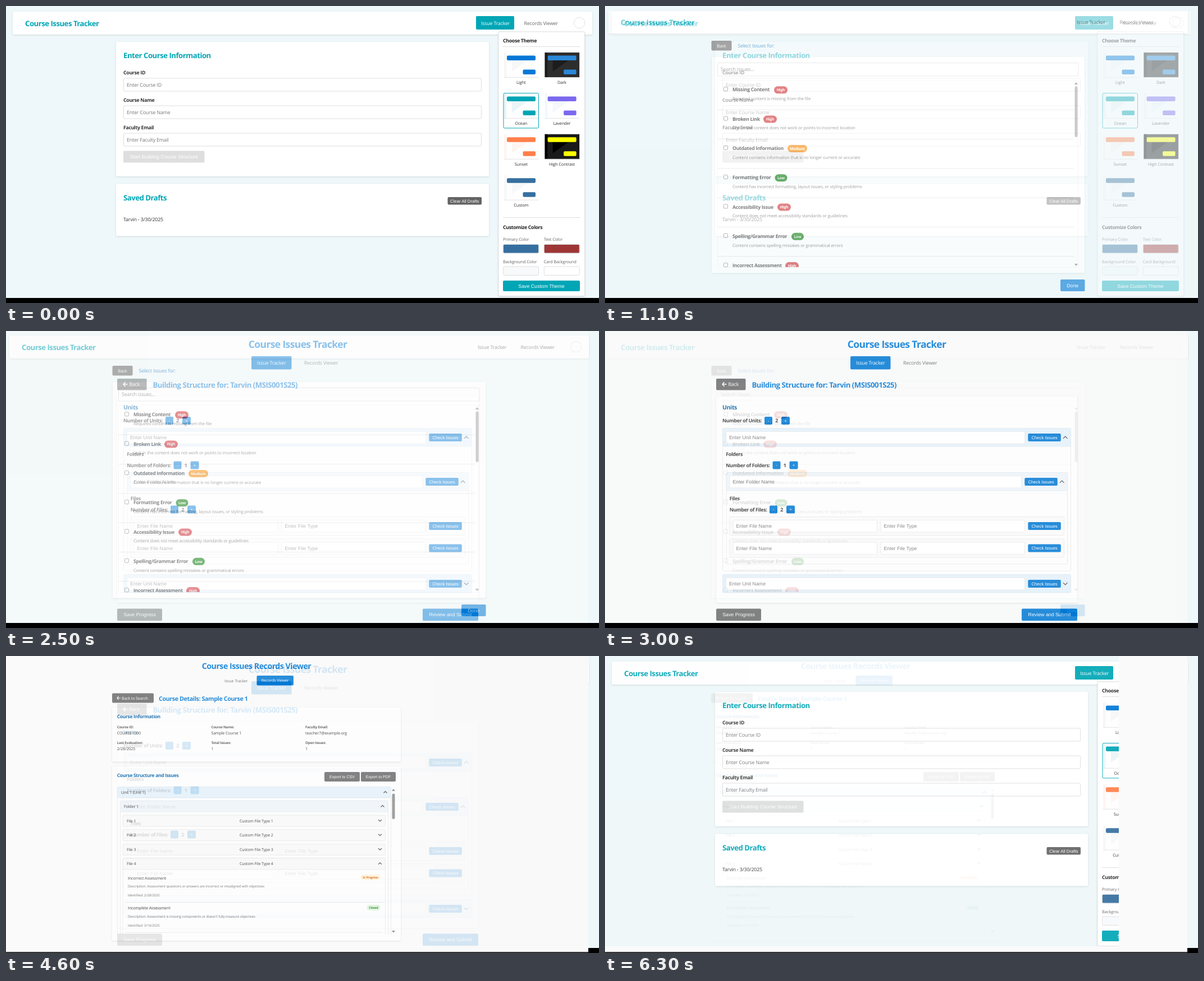
An HTML page that plays this animation: 1056 px wide and 530 px high, repeating every 6.4 s.

```html
<!DOCTYPE html>
<html lang="en">
<head>
<meta charset="utf-8">
<title>Course Issues Tracker</title>
<style>
  html, body { margin: 0; width: 100%; height: 100%; overflow: hidden; background: #eef7f9; }
  #stage { display: block; width: 1056px; height: 530px; }
  text { font-family: 'Open Sans', 'Noto Sans', sans-serif; letter-spacing: -.018em; text-rendering: geometricPrecision; }
  .b { font-weight: 700; letter-spacing: -.038em; }
  .a { font-family: 'Liberation Sans', Arial, sans-serif; letter-spacing: 0; }
  .m { text-anchor: middle; }
  .sh { filter: drop-shadow(0 1px 1.5px rgba(0, 0, 0, .12)); }
</style>
</head>
<body>
<svg id="stage" viewBox="0 0 1056 530"></svg>
<script>
const TEAL = '#00a6b6', BLUE = '#0078d4', NAVY = '#0061a8', GREY = '#6b6b6b',
      INK = '#333', SOFT = '#666', HINT = '#757575', LINE = '#dedede', FAINT = '#e9e9e9',
      SEA = '#eef7f9', PAPER = '#fafafa', SHEET = '#fdfdfd', WHITE = '#fff';
const PERSON = 'Tarvin';

// Drawing helpers: every one returns SVG markup. Text is placed by its left (or middle) and cap centre.
const text = (x, y, str, size = 8.8, fill = INK, cls = '') =>
  `<text x="${x}" y="${(y + size * .36).toFixed(2)}" font-size="${size}" fill="${fill}" class="${cls}">${str}</text>`;

const box = (x1, y1, x2, y2, fill, stroke = '', r = 2, cls = '') => {
  const i = stroke ? .5 : 0;
  return `<rect x="${x1 + i}" y="${y1 + i}" width="${x2 - x1 - 2 * i}" height="${y2 - y1 - 2 * i}" rx="${r}" ` +
    `fill="${fill}" stroke="${stroke || 'none'}" class="${cls}"/>`;
};

const path = (d, stroke, width = 1, fill = 'none') =>
  `<path d="${d}" fill="${fill}" stroke="${stroke}" stroke-width="${width}"/>`;

const rule = (x1, x2, y, color = LINE) => path(`M${x1} ${y}H${x2}`, color);
const card = (x1, y1, x2, y2, fill = WHITE) => box(x1, y1, x2, y2, fill, '', 2, 'sh');
const field = (x1, y1, x2, y2, hint, cls = '', line = LINE) =>
  box(x1, y1, x2, y2, WHITE, line) + text(x1 + 6, (y1 + y2) / 2, hint, 8.8, HINT, cls);
const button = (x1, y1, x2, y2, fill, label, size = 8.8, cls = 'a', ink = WHITE) =>
  box(x1, y1, x2, y2, fill) + text((x1 + x2) / 2, (y1 + y2) / 2, label, size, ink, cls + ' m');
const chevron = (x, y, up, s = 3.8) => {
  const h = up ? -s / 2 : s / 2;
  return path(`M${x - s} ${y - h}L${x} ${y + h}L${x + s} ${y - h}`, '#444', 1.2);
};
const arrow = (x, y, s) =>
  path(`M${x + s} ${y}H${x + .6}M${x + s / 2} ${y - s / 2}L${x + .6} ${y}L${x + s / 2} ${y + s / 2}`, WHITE, s / 5.5);
const scrollbar = (x, top, from, to, bottom, fill) =>
  path(`M${x - 3} ${top + 2}h6l-3 -4zM${x - 3} ${bottom - 2}h6l-3 4z`, 'none', 0, '#888') +
  box(x - 2.5, from, x + 2.5, to, fill, '', 2.5);
const pill = (x1, y1, x2, y2, fill, label, size, ink) =>
  box(x1, y1, x2, y2, fill, '', (y2 - y1) / 2) +
  `<g font-weight="700">${text((x1 + x2) / 2, (y1 + y2) / 2, label, size, ink, 'm')}</g>`;
const clip = (w, h, body) => `<svg width="${w}" height="${h}">${body}</svg>`;

// Header bar shared by the two teal screens; the second sits 6 px further left.
const header = (x, y, active) =>
  card(x, y, x + 1032, y + 41) +
  text(x + 22, y + 21, 'Course Issues Tracker', 13.2, TEAL, 'b') +
  (active ? box(x + 825, y + 8, x + 893, y + 32, TEAL) : '') +
  text(x + 834, y + 20.4, 'Issue Tracker', 8.8, active ? WHITE : SOFT) +
  text(x + 910.5, y + 20.4, 'Records Viewer', 8.8, SOFT) +
  `<circle cx="${x + 1009}" cy="${y + 20}" r="9.7" fill="#fff" stroke="#e2e2e2"/>`;

function themeTile(i, [name, color, bg, panel]) {
  const x = 887 + 72.6 * (i % 2), y = 83 + 72.9 * Math.floor(i / 2);
  return box(x, y, x + 61.5, y + 44.5, panel, '', 0) +
    path(`M${x} ${y}h4.5v44h-4.5zM${x + 14} ${y + 14}h28l-28 20z`, 'none', 0, bg) +
    rule(x, x + 61.5, y + 44.5, '#e2e2e2') +
    box(x + 5, y + 5.5, x + 56, y + 14, color) +
    box(x + 33.5, y + 30.5, x + 56, y + 39, color) +
    text(x + 30.3, y + 53.3, name, 7.48, INK, 'm') +
    (name === 'Ocean' ? box(x - 1.5, y - .8, x + 62, y + 62.5, 'none', TEAL) : '');
}

function themePanel() {
  const themes = [
    ['Light', '#0078d7', '#f7f7f7', '#fefefe'], ['Dark', '#2b88d8', '#1c1c1c', '#2d2d2d'],
    ['Ocean', '#00a5b5', '#eaf5f7', '#fefefe'], ['Lavender', '#7b68ee', '#f2f8fc', '#fefefe'],
    ['Sunset', '#ff7f4a', '#fff5f0', '#fefefe'], ['High Contrast', '#ffff00', '#000', '#1a1a1a'],
    ['Custom', '#366f9f', '#f6f8f9', '#fefefe']
  ];
  const swatches = [
    ['Primary Color', '#366f9f'], ['Text Color', '#9f3636'],
    ['Background Color', '#f8f9fa'], ['Card Background', WHITE]
  ];
  return box(876.5, 45.5, 1031, 518, WHITE, '#e0e0e0', 2, 'sh') +
    text(885, 62, 'Choose Theme', 8.8, '#222', 'b') + rule(885, 1022, 72.5) +
    themes.map((t, i) => themeTile(i, t)).join('') +
    rule(885, 1022, 377.5) + text(885, 394.5, 'Customize Colors', 8.8, '#222', 'b') +
    swatches.map(([name, color], i) => {
      const x = 885 + 72.7 * (i % 2), y = i < 2 ? 425 : 464.5;
      return text(x, y - 8.3, name, 7.48, SOFT) + box(x, y, x + 64, y + 16.5, color, i < 2 ? '#d0d6da' : LINE);
    }).join('') +
    button(885, 490, 1022, 509, TEAL, 'Save Custom Theme');
}

function entryScreen() {
  const fields = ['Course ID', 'Course Name', 'Faculty Email'].map((name, i) => {
    const y = 119 + 49 * i;
    return text(209, y, name, 8.8, INK, 'b') + field(209, y + 9.5, 847, y + 33.5, 'Enter ' + name);
  });
  return box(0, 0, 1056, 521, SEA, '', 0) + header(12, 10, true) +
    card(196, 64, 860, 304) + text(209, 88.5, 'Enter Course Information', 13.2, TEAL, 'b') + fields.join('') +
    button(209, 258.5, 353.5, 279.5, '#dedede', 'Start Building Course Structure') +
    card(196, 317.5, 860, 410.5) + text(209, 342, 'Saved Drafts', 13.2, TEAL, 'b') +
    button(786.5, 341, 847, 354.5, '#646464', 'Clear All Drafts', 7.7) +
    text(209, 381, PERSON + ' - 3/30/2025') + themePanel();
}

function issuesScreen() {
  const tint = { High: '#d13438', Medium: '#fa9214', Low: '#107c10' };
  const issues = [
    ['Missing Content', 'High', 301, 24, 'Required content is missing from the file'],
    ['Broken Link', 'High', 282, 24, 'Link in the content does not work or points to incorrect location'],
    ['Outdated Information', 'Medium', 325, 35, 'Content contains information that is no longer current or accurate'],
    ['Formatting Error', 'Low', 302.5, 22, 'Content has incorrect formatting, layout issues, or styling problems'],
    ['Accessibility Issue', 'High', 307, 24, 'Content does not meet accessibility standards or guidelines'],
    ['Spelling/Grammar Error', 'Low', 332, 22, 'Content contains spelling mistakes or grammatical errors'],
    ['Incorrect Assessment', 'High', 321, 24, '']
  ];
  const rows = issues.map(([title, level, x, w, note], i) => {
    const y = 149.3 + 52.3 * i;
    return box(211, y - 5, 219, y + 3, WHITE, '#888', 1) + text(227, y, title, 8.8, INK, 'b') +
      pill(x, y - 6, x + w, y + 7, tint[level], level, 6.6, WHITE) +
      text(227, y + 16, note, 7.7, SOFT) + rule(200, 835, y + 36, '#e0e0e0');
  });
  return box(0, 0, 1056, 521, SEA, '', 0) + header(6, 8, false) +
    button(189.5, 62, 225.5, 79.5, GREY, 'Back', 7.7, '') +
    text(236.5, 71, 'Select Issues for:', 8.8, '#0f76c2') +
    card(190, 91, 854, 476.5) + field(200, 101, 843.5, 125.5, 'Search issues...') +
    box(200, 132, 843, 467, 'none', '#f3f3f3') + clip(1056, 466, rows.join('')) +
    scrollbar(839, 138, 143.5, 234, 462, '#a8a8a8') + button(811, 488, 854.5, 509, BLUE, 'Done');
}

function builderScreen() {
  const counter = (x, y, label, x2, n) =>
    text(x, y, label, 8.8, INK, 'b') + button(x2, y - 7, x2 + 14, y + 7, BLUE, '-', 7.7) +
    text(x2 + 21.6, y, n, 8.8, INK, 'b m') + button(x2 + 30, y - 7, x2 + 45, y + 7, BLUE, '+', 7.7);
  const check = (x, y) => button(x, y - 7, x + 58.5, y + 7, BLUE, 'Check Issues', 7.7);
  const entry = (x1, x2, y, hint) => field(x1, y - 11, x2, y + 11.5, hint, 'a', FAINT);
  const bar = (x1, x2, y, fill, hint, up) =>
    box(x1, y - 17, x2, y + 16.5, fill, '#e0e9f0') + entry(x1 + 6, x2 - 82, y, hint) +
    check(x2 - 76.7, y) + chevron(x2 - 10.3, y, up);
  const file = y =>
    box(221.5, y - 17, 818, y + 17, PAPER, FAINT) + entry(227.5, 485, y, 'Enter File Name') +
    entry(490.5, 748, y, 'Enter File Type') + check(753.3, y);
  return box(0, 0, 1037, 521, PAPER, '', 0) +
    text(519.5, 24, 'Course Issues Tracker', 17.6, BLUE, 'b m') +
    button(437, 45, 508.5, 68.5, BLUE, 'Issue Tracker', 8.8, '') + text(531, 57, 'Records Viewer', 8.8, SOFT) +
    box(198, 85, 250.5, 105.5, GREY) + arrow(208.5, 95, 8) + text(219.5, 95.2, 'Back', 8.8, WHITE) +
    text(261.5, 96.5, `Building Structure for: ${PERSON} (MSIS001S25)`, 13.2, BLUE, 'b') +
    card(198, 117, 841, 485, SHEET) + text(209, 136.5, 'Units', 10.56, NAVY, 'b') +
    counter(209, 160, 'Number of Units:', 284, 2) +
    box(209, 173, 830, 428.5, SHEET, FAINT) + bar(209, 830, 190, '#e3f0fa', 'Enter Unit Name', true) +
    text(215.3, 220, 'Folders', 8.8, INK, 'b') + counter(215.3, 239.5, 'Number of Folders:', 298.5, 1) +
    box(215.5, 252, 824, 416.5, SHEET, FAINT) + bar(215.5, 824, 269, '#eef4f9', 'Enter Folder Name', true) +
    text(221.7, 299, 'Files', 8.8, INK, 'b') + counter(221.7, 318.5, 'Number of Files:', 293, 2) +
    file(348) + file(387.5) + bar(209, 830, 451, '#e3f0fa', 'Enter Unit Name', false) +
    button(198, 495.5, 278, 517, GREY, 'Save Progress') + button(742, 495.5, 841, 517, BLUE, 'Review and Submit');
}

function recordsScreen() {
  const facts = [
    ['Course ID:', 'COURSE1000'], ['Course Name:', 'Sample Course 1'], ['Faculty Email:', 'teacher7@example.org'],
    ['Last Evaluation:', '2/28/2025'], ['Total Issues:', '1'], ['Open Issues:', '1']
  ].map(([name, value], i) => {
    const x = 197.7 + 167.7 * (i % 3), y = i < 3 ? 126.5 : 154.5;
    return text(x, y, name, 6.27, '#555', 'b') + text(x, y + 10.7, value, 7.1);
  });
  const fileRow = n => {
    const y = 268.3 + 25.65 * n;
    return box(207.5, y - 10.5, 676, y + 10.5, '#f8f8f8', FAINT) + text(215, y, 'File ' + n, 7.1) +
      text(416, y, 'Custom File Type ' + n, 7.1) + chevron(666, y - .5, n === 4, 3);
  };
  const issue = (y, title, note, date) =>
    text(217, y, title, 7.1) + text(217, y + 14.6, 'Description: ' + note, 6.08, SOFT) +
    text(217, y + 31.2, 'Identified: ' + date, 6.08, SOFT) + rule(212, 671, y + 43.5, FAINT);
  const tree =
    box(198, 233, 686, 520, SHEET, FAINT) + box(198, 233, 686, 253.5, '#e3f0fa', '#e0e9f0') +
    text(205, 243.5, 'Unit 1 (Unit 1)', 7.1) + chevron(675.5, 243, true, 3) +
    box(203, 258, 681, 520, SHEET, FAINT) + box(203, 258, 681, 278.5, '#eef4f9', '#e4eaee') +
    text(210, 268.3, 'Folder 1', 7.1) + chevron(670.5, 268, true, 3) +
    box(207.5, 360, 676, 520, SHEET, FAINT) + [1, 2, 3, 4].map(fileRow).join('') +
    issue(396, 'Incorrect Assessment', 'Assessment questions or answers are incorrect or misaligned with objectives', '2/28/2025') +
    pill(631.5, 390, 666.5, 399.5, '#fff1d2', 'In Progress', 5.2, '#d65a10') +
    issue(449.8, 'Incomplete Assessment', "Assessment is missing components or doesn't fully measure objectives", '3/16/2025') +
    pill(642.5, 444, 666.5, 454, '#dcf3dc', 'Closed', 5.2, '#107c10');
  return box(0, 0, 1037, 521, PAPER, '', 0) +
    text(446, 18, 'Course Issues Records Viewer', 14.3, BLUE, 'b m') +
    text(389, 44, 'Issue Tracker', 7.1, SOFT) + button(446.5, 35, 512, 52.5, BLUE, 'Records Viewer', 7.1, '') +
    box(189, 66.5, 263, 83.5, GREY) + arrow(197.3, 75, 6.5) + text(206, 75, 'Back to Search', 7.1, WHITE) +
    text(272, 76, 'Course Details: Sample Course 1', 10.74, BLUE, 'b') +
    card(189, 92, 703, 188.5, SHEET) + text(197.7, 108, 'Course Information', 8.5, NAVY, 'b') + facts.join('') +
    card(189, 197, 703, 508, SHEET) + text(197.7, 212.5, 'Course Structure and Issues', 8.5, NAVY, 'b') +
    button(567, 207, 630, 224, GREY, 'Export to CSV', 7.1) + button(632, 207, 694, 224, GREY, 'Export to PDF', 7.1) +
    clip(1056, 497, tree) + scrollbar(690, 239, 245.5, 291, 492, '#8f8f8f');
}

// Opaque layers, bottom to top; each one fades in over the last.
const LOOP = 6400, STEP = 100, STEPS = 13, LEAD = 4;
const entry = entryScreen();
const layers = [
  ['entry', entry, 1056, 521],
  ['issues', issuesScreen(), 1056, 521, 400],
  ['builder', builderScreen(), 1037, 521, 2000],
  ['records', recordsScreen(), 1037, 521, 3600],
  ['again', entry, 915, 518, 5200]
];
const footer = box(0, 521, 1037, 528, PAPER, '', 0) + box(0, 528, 1037, 530, '#333', '', 0);

const stage = document.getElementById('stage');
stage.innerHTML = box(0, 0, 1056, 530, '#000', '', 0) +
  layers.map(([id, body, w, h]) => `<g id="${id}">${clip(w, h, body)}</g>`).join('') +
  `<g id="footer">${footer}</g>`;

function fade(id, start, count, peak) {
  const from = (start - LEAD) / LOOP, to = Math.min(1, from + count * STEP / LOOP);
  document.getElementById(id).animate([
    { opacity: 0, offset: 0 },
    { opacity: 0, offset: from, easing: `steps(${count}, start)` },
    { opacity: peak, offset: to },
    { opacity: peak, offset: 1 }
  ], { duration: LOOP, iterations: Infinity });
}

for (const [id, , , , start] of layers) {
  if (!start) continue;
  const count = Math.min(STEPS, (LOOP - start) / STEP);
  fade(id, start, count, count / STEPS);
}
fade('footer', 3200, 1, 1);
</script>
</body>
</html>
```
